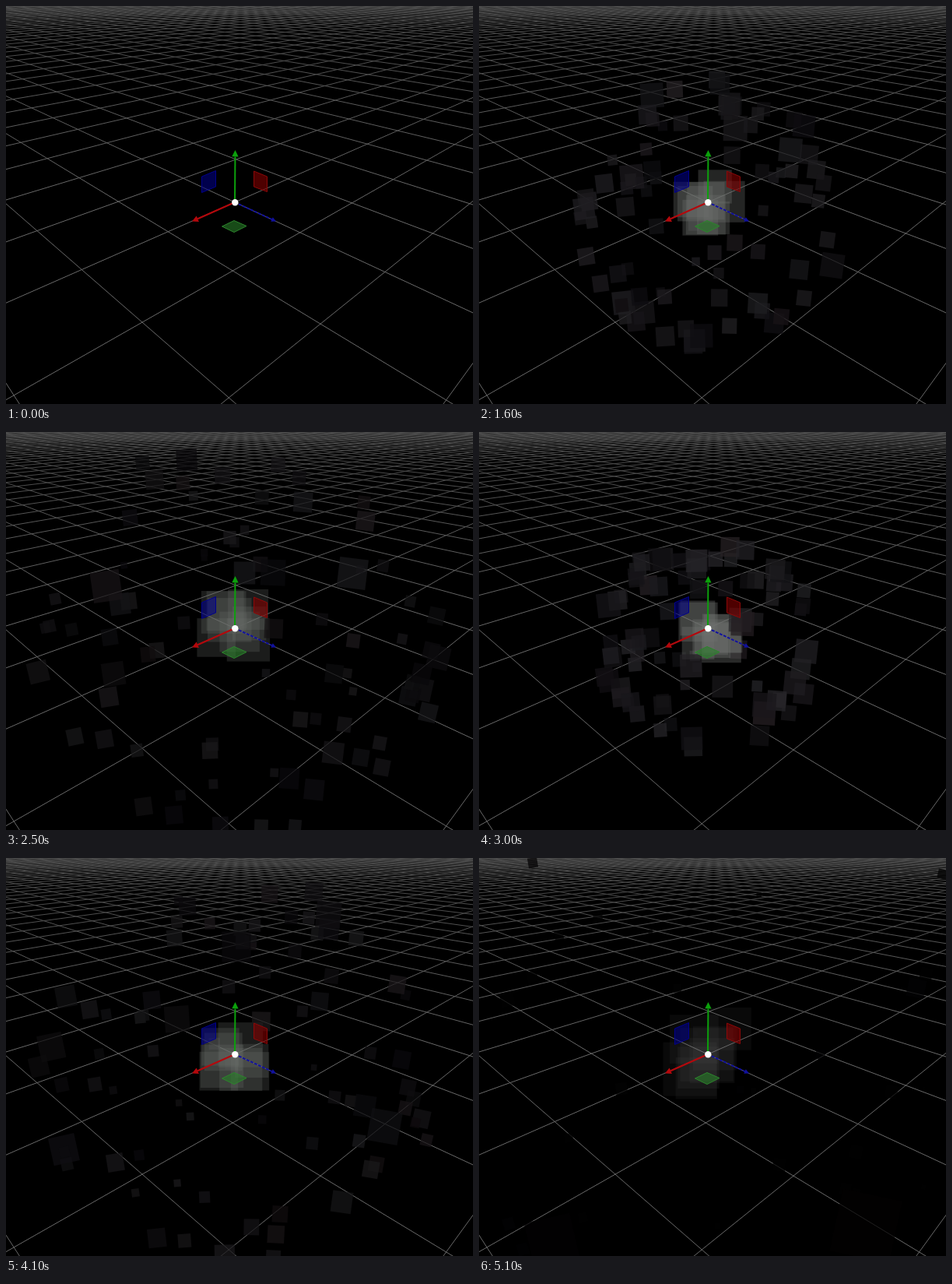
An HTML page with a canvas for the animation above (5.2 s loop, 600 px wide and 511 px high).

```html
<!DOCTYPE html>
<html lang="en">
<head>
<meta charset="utf-8">
<title>Particle burst</title>
<style>
  html, body { margin: 0; width: 100%; height: 100%; overflow: hidden; background: #000; }
  canvas { display: block; width: 600px; height: 511px; }
</style>
</head>
<body>
<canvas id="stage" width="600" height="511"></canvas>
<script>
const LOOP = 5200, STEP = 100;
const W = 600, H = 511, FOCAL = 580;
const ORIGIN = { x: 294, y: 252 };
const NADIR = { x: 300, y: 1385 };
const BURSTS = [1220, 1960, 2690, 3560, 4150];
const ctx = document.getElementById('stage').getContext('2d');

function seeded(seed) {
  return () => {
    seed = (seed + 0x6D2B79F5) | 0;
    let n = Math.imul(seed ^ (seed >>> 15), 1 | seed);
    n = (n + Math.imul(n ^ (n >>> 7), 61 | n)) ^ n;
    return ((n ^ (n >>> 14)) >>> 0) / 4294967296;
  };
}

// Perspective of the ground plane
const depth = (x, z) => 1 - 0.1135 * x - 0.1165 * z;
function ground(x, z) {
  const w = depth(x, z);
  return [(294 - 109.4 * x + 39.7 * z) / w, -42.5 + 294.5 / w];
}

function makeGrid() {
  const layer = document.createElement('canvas');
  layer.width = W;
  layer.height = H;
  const g = layer.getContext('2d');
  g.fillStyle = '#000';
  g.fillRect(0, 0, W, H);
  // Distant lines are dimmer
  const shade = g.createLinearGradient(0, 0, 0, 250);
  shade.addColorStop(0, '#4e4e4e');
  shade.addColorStop(0.15, '#464646');
  shade.addColorStop(0.5, '#585858');
  shade.addColorStop(1, '#686868');
  g.strokeStyle = shade;
  g.lineWidth = 1;
  const far = -56, nearest = 0.3;
  for (let k = far; k <= 10; k++) {
    const nearZ = (1 - nearest - 0.1135 * k) / 0.1165;
    const nearX = (1 - nearest - 0.1165 * k) / 0.1135;
    g.beginPath();
    g.moveTo(...ground(k, far));
    g.lineTo(...ground(k, nearZ));
    g.moveTo(...ground(far, k));
    g.lineTo(...ground(nearX, k));
    g.stroke();
  }
  return layer;
}

function makeBurst(start, index) {
  const rnd = seeded(71 + index * 131);
  const list = (count, make) => Array.from({ length: count }, make);
  const debris = list(82, () => {
    const dz = rnd() * 2 - 1, angle = rnd() * Math.PI * 2, flat = Math.sqrt(1 - dz * dz);
    return {
      dx: Math.cos(angle) * flat, dy: Math.sin(angle) * flat, dz,
      speed: 0.67 + rnd() * 0.1, half: 9 + rnd() * 6, shrink: rnd(),
      tone: 18 + rnd() * 38, warm: rnd() < 0.12 ? 8 : 2
    };
  });
  const smoke = list(8, () => ({
    x: rnd() * 2 - 1, y: rnd() * 2 - 1, size: 0.8 + rnd() * 0.3
  }));
  const flames = list(18, () => ({
    x: (rnd() * 2 - 1) * 15, y: (rnd() * 2 - 1) * 14, half: 6 + rnd() * 5, hue: 20 + rnd() * 25
  }));
  return { start, debris, smoke, flames };
}

function drawDebris(p, t) {
  const r = p.speed * t, w = 1 - r * p.dz;
  const x = 300 + (-6 + FOCAL * r * p.dx) / w;
  const y = 255.5 + (14 + FOCAL * r * p.dy) / w;
  const half = p.half * (1 - p.shrink * Math.min(t, 0.95)) / w;
  const glow = Math.max(0, 1.02 - t), tone = p.tone * glow;
  ctx.save();
  ctx.translate(x, y);
  ctx.rotate(Math.atan2(x - NADIR.x, NADIR.y - y));
  ctx.fillStyle = `rgba(${tone + p.warm * glow},${tone},${tone + 5 * glow},0.72)`;
  ctx.fillRect(-half, -half * 1.05, half * 2, half * 2.1);
  ctx.restore();
}

function square(x, y, half) {
  ctx.fillRect(ORIGIN.x + x - half, ORIGIN.y + y - half, half * 2, half * 2);
}

function drawSmoke(puffs, t) {
  const reach = 14 + 20 * t, alpha = 0.4 * Math.pow(Math.max(0, 1.25 - t), 1.3);
  ctx.fillStyle = `rgba(108,111,108,${alpha})`;
  for (const p of puffs) square(p.x * reach, p.y * reach, (20 + 13 * t) * p.size);
}

function drawFlames(flames, t) {
  if (t > 0.2) return;
  ctx.globalAlpha = Math.min(1, 1.15 - t * 5);
  for (const f of flames) {
    ctx.fillStyle = `hsl(${f.hue},100%,51%)`;
    square(f.x, f.y, f.half * (1 + 2 * t));
  }
  ctx.globalAlpha = 1;
}

function drawBurst({ debris, smoke, flames }, t) {
  const drawSide = front => debris
    .filter(p => (p.dz >= 0) === front)
    .forEach(p => drawDebris(p, t));
  const young = t < 0.2;
  drawSide(false);
  if (young) drawSide(true);
  drawSmoke(smoke, t);
  drawFlames(flames, t);
  if (!young) drawSide(true);
}

function polygon(points, fill, stroke) {
  ctx.beginPath();
  points.forEach(([x, y]) => ctx.lineTo(x, y));
  ctx.closePath();
  ctx.fillStyle = fill;
  ctx.fill();
  if (stroke) {
    ctx.strokeStyle = stroke;
    ctx.lineWidth = 1;
    ctx.stroke();
  }
}

function arrow(x, y, color, width, head, dash = []) {
  const dx = x - ORIGIN.x, dy = y - ORIGIN.y, length = Math.hypot(dx, dy);
  const ux = dx / length, uy = dy / length;
  const bx = x - ux * head * 2, by = y - uy * head * 2;
  ctx.strokeStyle = color;
  ctx.lineWidth = width;
  ctx.setLineDash(dash);
  ctx.beginPath();
  ctx.moveTo(ORIGIN.x, ORIGIN.y);
  ctx.lineTo(bx, by);
  ctx.stroke();
  ctx.setLineDash([]);
  polygon([[x, y], [bx - uy * head, by + ux * head], [bx + uy * head, by - ux * head]], color);
}

function drawGizmo() {
  polygon([[251.5, 219], [269.5, 211.5], [269.5, 232], [251.5, 239.5]], 'rgba(0,0,140,.55)', '#00008c');
  polygon([[318.5, 212], [335.5, 219], [335.5, 238.5], [318.5, 232]], 'rgba(130,0,0,.6)', '#8c0808');
  polygon([[277.5, 283], [293, 275.5], [309, 282.5], [293, 290.5]], 'rgba(40,125,40,.6)', '#2c842c');
  arrow(347, 276.5, '#1010a0', 1.9, 3, [4, 1.5]);
  arrow(239, 276.5, '#b4080c', 2, 4);
  arrow(294.5, 185, '#0ca00c', 2, 4.2);
  ctx.fillStyle = '#fff';
  ctx.beginPath();
  ctx.arc(ORIGIN.x + 0.3, ORIGIN.y + 0.3, 4.2, 0, Math.PI * 2);
  ctx.fill();
}

const grid = makeGrid();
const bursts = BURSTS.map(makeBurst);

function draw(ms) {
  const time = Math.floor((ms % LOOP) / STEP) * STEP;
  ctx.drawImage(grid, 0, 0);
  const current = bursts.filter(b => b.start <= time).pop();
  if (current) drawBurst(current, (time - current.start) / 1000);
  drawGizmo();
}

const began = performance.now();
function tick() {
  draw(performance.now() - began);
  requestAnimationFrame(tick);
}
tick();
</script>
</body>
</html>
```
